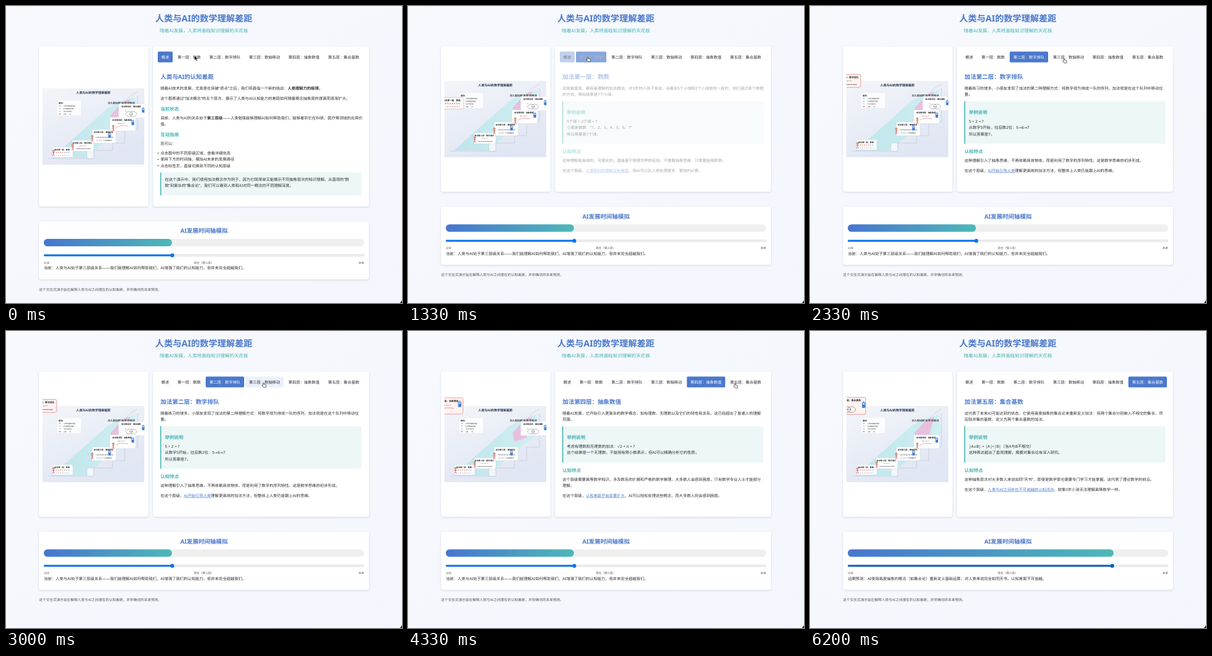
Recreate the animation shown at these times as an HTML page. Size 587 by 440 pixels, loop 6.26 s.

```html
<!DOCTYPE html>
<html lang="zh">
<head>
<meta charset="utf-8">
<style>
html, body { margin: 0; width: 100%; height: 100%; overflow: hidden; background: #f6f8fd; }
svg { display: block; width: 100vw; height: 100vh; }
text { font-family: "Noto Sans", "DejaVu Sans", "Noto Sans CJK SC", "Noto Sans CJK", sans-serif; font-weight: 500; text-rendering: geometricPrecision; fill: #2b2b2b; white-space: pre; }
.panel { fill: #fff; filter: drop-shadow(0 1.2px 1.8px rgba(40, 60, 110, .16)); }
</style>
</head>
<body>
<svg id="stage" viewBox="0 0 587 440">
  <defs>
    <linearGradient id="page" x2="1" y2="1"><stop stop-color="#f7f9fd"/><stop offset="1" stop-color="#f3f6fc"/></linearGradient>
    <linearGradient id="chartBg" x2=".5" y2="1"><stop stop-color="#f3f5f9"/><stop offset="1" stop-color="#e0e6f3"/></linearGradient>
    <linearGradient id="band" x2="1" y2=".2"><stop stop-color="#a5e0e6"/><stop offset="1" stop-color="#c9f0f0"/></linearGradient>
    <linearGradient id="fill"><stop stop-color="#4776cf"/><stop offset="1" stop-color="#4db8b8"/></linearGradient>
    <clipPath id="chartClip"><rect x="54" y="40" width="151.5" height="260"/></clipPath>
  </defs>
  <rect width="587" height="440" fill="url(#page)"/>
</svg>
<script>
const BLUE = '#4a78cb', TEAL = '#45b3b5', BODY = 5.78, LOOP = 6260, TICK = 200 / 3;
const stage = document.getElementById('stage');

function add(parent, tag, attrs = {}) {
  const el = document.createElementNS('http://www.w3.org/2000/svg', tag);
  set(el, attrs);
  parent.append(el);
  return el;
}
function set(el, attrs) {
  for (const key in attrs) el.setAttribute(key, attrs[key]);
}
function rect(parent, x, y, width, height, fill, rx = 0, more = {}) {
  return add(parent, 'rect', { x, y, width, height, fill, rx, ...more });
}
// y is the optical middle of the line; *bold* and [link] are marked inline
function label(parent, x, y, str, size = BODY, style = {}) {
  const el = add(parent, 'text', { x, y: y + size * .37, 'font-size': size });
  Object.assign(el.style, style);
  for (const part of str.split(/(\*[^*]+\*|\[[^\]]+\])/)) {
    if (!part) continue;
    const mark = part[0], marked = mark === '*' || mark === '[';
    const span = add(el, 'tspan');
    span.textContent = marked ? part.slice(1, -1) : part;
    if (mark === '*') span.style.fontWeight = 700;
    if (mark === '[') Object.assign(span.style, { fill: BLUE, textDecoration: 'underline' });
  }
  return el;
}
const bold = fill => ({ fontWeight: 700, fill });
const mid = style => ({ textAnchor: 'middle', ...style });

// Header and panels
label(stage, 293.3, 18, '人类与AI的数学理解差距', 13, mid(bold(BLUE)));
label(stage, 293.5, 36.5, '随着AI发展，人类将面临知识理解的天花板', 6.9, mid({ fill: TEAL }));
const panels = [[49, 162], [218, 320]].map(([x, w]) => rect(stage, x, 60, w, 237, '#fff', 3, { class: 'panel' }));
add(stage, 'path', { d: 'M587 436v4h-3z', fill: '#222' });

// Chart
const chart = add(add(stage, 'g', { 'clip-path': 'url(#chartClip)' }), 'g');
rect(chart, 54, 111, 151, 113, 'url(#chartBg)');
add(chart, 'path', { d: 'M68 214L150 141 168 131 190 124 196 150 160 178 130 204V214Z', fill: 'url(#band)', opacity: .7 });
add(chart, 'path', { d: 'M155 151L172 132 184 127 176 158 158 164Z', fill: '#f7a8d8', opacity: .65 });
add(chart, 'path', { d: 'M63 215H130V203H158V192H176V172H195V122', fill: 'none', stroke: '#b3bccb', 'stroke-width': .5 });
rect(chart, 120, 203, 10, 12, '#f2f7fb', 0, { stroke: '#b3bccb', 'stroke-width': .4 });
add(chart, 'path', { d: 'M176 132Q184 120 195 116', fill: 'none', stroke: '#d77a9f', 'stroke-width': .5, 'stroke-dasharray': '1 .7' });
label(chart, 129.5, 117.5, '人类与AI的数学理解差距', 4.6, mid(bold('#26324a')));
label(chart, 171, 133, '对人类如同“天书”的知识', 3.7, mid(bold('#333')));
rect(chart, 76, 129, 35, 22, '#fff', .8, { opacity: .85 });
label(chart, 78, 133, '图例:', 3, bold('#333'));
['人类可理解的范围', 'AI可理解的范围', '“天书”的知识', '人类        AI'].forEach((row, i) => {
  rect(chart, 78.5, 136.4 + i * 4, 2.6, 1.2, ['#8fb6e8', '#8adada', '#f7a8d8', '#e66'][i]);
  label(chart, 85, 137 + i * 4, row, 2.2);
});

function person(g, x, y) {
  add(g, 'circle', { cx: x, cy: y - 3, r: 1.4, fill: '#f0bd95', stroke: '#7a4a35', 'stroke-width': .5 });
  add(g, 'path', { d: `M${x} ${y - 1.5}v3.5l-1.4 2.6m1.4-2.6l1.4 2.6M${x - 1.8} ${y}h3.6`, stroke: '#d9534f', 'stroke-width': .8, fill: 'none' });
}
function robot(g, x, y) {
  rect(g, x - 2, y - 3.5, 4, 7, '#4a86dc', .8);
  rect(g, x - 1.3, y - 2.4, 2.6, 1.5, '#dcecff', .3);
  add(g, 'path', { d: `M${x} ${y - 3.5}v-1.4M${x - 1} ${y + 1}h2`, stroke: '#2b4f92', 'stroke-width': .5 });
}
function axis(g, x, y, w) {
  add(g, 'path', { d: `M${x} ${y}h${w}m-1-.8l1 .8l-1 .8`, stroke: '#444', 'stroke-width': .4, fill: 'none' });
  for (let i = 1; i < 7; i++) add(g, 'circle', { cx: x + i * w / 7, cy: y, r: .5, fill: i === 5 ? '#e33' : '#555' });
}
const art = [
  g => {
    for (let i = 0; i < 7; i++) add(g, 'circle', { cx: -9 + i * 3, cy: .5, r: .7, fill: i < 5 ? '#e4514d' : '#4a86dc' });
    label(g, 0, 4.5, '1、2、3、4、5、6、7', 2, mid({}));
    person(g, -13.5, 1);
  },
  g => {
    label(g, 0, 0, '5 + 2 = 7', 2.4, mid({}));
    axis(g, -11, 4.5, 22);
    person(g, -15, 2);
  },
  g => {
    axis(g, -13, 1.5, 26);
    label(g, 0, 6, '5 + 2.5 = 7.5 数轴移动', 2.3, mid({}));
    person(g, -17.5, 3);
    robot(g, 8, -1);
  },
  g => {
    label(g, -2, -1, '√2 + π = ?', 2.5, mid({}));
    add(g, 'path', { d: 'M-10 5Q-3 1 8 3', stroke: '#e33', 'stroke-width': .4, fill: 'none' });
    person(g, -14, 6);
    robot(g, 15, -2);
  },
  g => {
    for (const x of [-4, 2]) add(g, 'ellipse', { cx: x, cy: 4.5, rx: 5, ry: 3.6, fill: 'none', stroke: '#555', 'stroke-width': .4 });
    label(g, -1, 4.5, 'A∪B', 2.2, mid({}));
    label(g, -10, 0, '?', 3, bold('#e33'));
    robot(g, 17, -1);
  }
];
// centre, size, title, right edge when selected
const GROW = .2;
const cards = [
  [84, 205.5, 30, 15, '加法第一层：数数', 74],
  [114, 196, 32, 16, '加法第二层：数字排队', 75],
  [145.5, 182, 35, 20, '加法第三层：数轴移动', 79],
  [173, 164, 38, 20, '加法第四层：抽象数值', 81.5],
  [186.5, 144.5, 39, 21, '加法第五层：集合基数', 82.5]
].map(([cx, cy, w, h, title, right], i) => {
  const g = add(chart, 'g'), box = [-w / 2, -h / 2, w, h];
  rect(g, ...box, '#fff', 1, { stroke: '#c9d3e2', 'stroke-width': .4 });
  const glow = rect(g, ...box, '#fff3f2', 2, { stroke: '#f08a8a', 'stroke-width': .6 });
  label(g, -1, -h / 2 + 4, title, 2.9, mid(bold('#222')));
  art[i](g);
  return { g, glow, cx, cy, tx: right - w * (1 + GROW) / 2 };
});

// Tabs
const tabs = [
  ['概述', 225, 22], ['第一层：数数', 249, 45], ['第二层：数字排队', 296, 57],
  ['第三层：数轴移动', 354.8, 56.8], ['第四层：抽象数值', 413.4, 56.8], ['第五层：集合基数', 472, 57]
].map(([name, x, w]) => ({
  hover: rect(stage, x, 67.4, w, 16.2, '#ebf1fb', 1.6),
  on: rect(stage, x, 67.4, w, 16.2, BLUE, 1.6),
  text: label(stage, x + w / 2, 75.6, name, BODY, mid({}))
}));

// Tab pages: one line is [y, text, x?]
function page(title, heads, box, lines) {
  const g = add(stage, 'g');
  rect(g, 228.5, box[0], 298.5, box[1] - box[0], '#edf7f7', 1.5);
  rect(g, 228.5, box[0], 1.7, box[1] - box[0], '#56bdbb');
  label(g, 229, 105, title, 8.7, bold(BLUE));
  for (const [y, str, x = 229] of heads) label(g, x, y, str, 6.8, bold(TEAL));
  for (const [y, str, x = 229] of lines) label(g, x, y, str);
  return g;
}
const IN = 235.5;
const lesson = (title, bottom, lines) => page(title,
  [[157, '举例说明', IN], [bottom + 11, '认知特点']], [141, bottom], lines);
const pages = [
  page('人类与AI的认知差距', [[152, '当前状态'], [190, '互动指南']], [246.5, 280.5], [
    [122, '随着AI技术的发展，尤其是在突破“奇点”之后，我们将面临一个新的挑战：*人类理解力的极限*。'],
    [136.5, '这个图表通过“加法概念”的五个层次，展示了人类与AI认知能力的差距如何随着概念抽象度的提高而逐渐扩大。'],
    [166, '目前，人类与AI的关系处于*第三层级*——人类勉强能够理解AI如何帮助我们，能够看到它在科研、医疗等领域的应用价'],
    [175, '值。'],
    [203.5, '您可以：'],
    [218, '点击图中的不同层级区域，查看详细信息'],
    [227.2, '使用下方的时间轴，模拟AI未来的发展路径'],
    [236.5, '点击标签页，直接切换到不同的认知层级'],
    [256.5, '在这个演示中，我们使用加法概念作为例子，因为它既简单又能展示不同抽象层次的知识理解。从直观的“数', IN],
    [266, '数”到复杂的“集合论”，我们可以看到人类和AI对同一概念的不同理解深度。', IN]
  ]),
  lesson('加法第一层：数数', 204, [
    [122, '这是最直观、最容易理解的加法概念。对3岁的小孩子来说，当看到5个小球和2个小球放在一起时，他们通过逐个数数'],
    [131, '的方式，得出结果是7个小球。'],
    [171, '5个球 + 2个球 = ?', IN],
    [180, '小朋友数数：“1、2、3、4、5、6、7”', IN],
    [189.5, '所以答案是7个球。', IN],
    [229, '这种理解是具体的、可视化的，直接基于物理世界的经验。不需要抽象思维，只需要能够数数。'],
    [243.5, '在这个层级，[人类和AI的理解没有差距]，但AI可以比人类处理更多、更快的计算。']
  ]),
  lesson('加法第二层：数字排队', 204, [
    [122, '随着练习的增多，小朋友发现了加法的第二种理解方式：将数字视为排成一队的序列，加法就是在这个队列中移动位'],
    [131, '置。'],
    [171, '5 + 2 = ?', IN],
    [180, '从数字5开始，往后数2位：5→6→7', IN],
    [189.5, '所以答案是7。', IN],
    [229, '这种理解引入了抽象思维，不再依赖具体物体，而是利用了数字的序列特性。这是数学思维的初步形成。'],
    [243.5, '在这个层级，[AI开始引导人类]理解更高效的加法方法，但整体上人类仍能跟上AI的思维。']
  ]),
  lesson('加法第三层：数轴移动', 204, [
    [122, '这个层级代表了我们目前所处的阶段。AI将“数字排队”的概念扩展到更抽象的“数轴”上，不仅包含整数，还有分数和小'],
    [131, '数。'],
    [171, '在数轴上，5 + 2.5 = ?', IN],
    [180, '从位置5开始，向右移动2.5个单位', IN],
    [189.5, '所以答案是7.5。', IN],
    [229, '这种理解引入了更复杂的数学概念（连续性、实数线），但人类通过努力，仍然能够理解这个抽象概念。这代表了基础'],
    [238, '教育中的数学概念。'],
    [252.5, '[我们现在就处于这个阶段]——AI能够帮助我们理解和解决问题，而我们也能大致理解AI的思考方式。']
  ]),
  lesson('加法第四层：抽象数值', 195, [
    [122, '随着AI发展，它开始引入更复杂的数学概念，如有理数、无理数以及它们的特性和关系。这已经超出了普通人的理解'],
    [131, '范围。'],
    [171, '考虑有理数和无理数的加法：√2 + π = ?', IN],
    [180, '这个结果是一个无理数，不能用有限小数表示，但AI可以精确分析它的性质。', IN],
    [220, '这个层级需要高等数学知识，涉及数系的扩展和严格的数学推理。大多数人会感到困惑，只有数学专业人士才能部分'],
    [229, '理解。'],
    [243.5, '在这个层级，[认知差距开始显著扩大]，AI可以轻松处理这些概念，而大多数人则会感到困惑。']
  ]),
  lesson('加法第五层：集合基数', 195, [
    [122, '这代表了未来AI可能达到的状态，它使用高度抽象的集合论来重新定义加法：将两个集合分别嵌入不相交的集合，然'],
    [131, '后取并集的基数，定义为两个集合基数的加法。'],
    [171, '|A∪B| = |A|+|B|（当A与B不相交）', IN],
    [180, '这种表达超出了直观理解，需要对集合论有深入研究。', IN],
    [220, '这种抽象层次对大多数人来说如同“天书”，即使是数学家也需要专门学习才能掌握。这代表了理论数学的前沿。'],
    [234.5, '在这个层级，[人类与AI之间存在不可逾越的认知鸿沟]，就像3岁小孩无法理解高等数学一样。']
  ])
];
for (const y of [218, 227.2, 236.5]) add(pages[0], 'circle', { cx: 225.5, cy: y, r: .8, fill: '#333' });

// Timeline panel and footer
const low = add(stage, 'g');
rect(low, 49, 319, 489, 86, '#fff', 3, { class: 'panel' });
label(low, 293.5, 333, 'AI发展时间轴模拟', 8.7, mid(bold(BLUE)));
rect(low, 56, 345, 475, 11, '#efefef', 5.5);
const fill = rect(low, 56, 345, 190, 11, 'url(#fill)', 5.5);
rect(low, 56, 368, 475, 2.8, '#ededed', 1.4, { stroke: '#d2d2d2', 'stroke-width': .4 });
const track = rect(low, 56, 368, 190, 2.8, '#0a75f0', 1.4);
const thumb = add(low, 'circle', { cy: 369.4, r: 2.8 });
label(low, 56, 380, '过去', 4.2, { fill: '#555' });
label(low, 293, 380, '现在（第三层）', 4.2, mid({ fill: '#555' }));
label(low, 531, 380, '未来', 4.2, { textAnchor: 'end', fill: '#555' });
const notes = [
  '当前：人类与AI处于第三层级关系——我们能理解AI如何帮助我们，AI增强了我们的认知能力，但并未完全超越我们。',
  '远期预测：AI使用高度抽象的概念（如集合论）重新定义基础运算，对人类来说完全如同天书。认知差距不可逾越。'
].map(str => label(low, 56.3, 388.3, str));
label(low, 49, 420, '这个交互式演示旨在解释人类与AI之间潜在的认知差距，并非确切的未来预测。', 5.2, { fill: '#555' });

// Pointer
const pointer = add(stage, 'g');
const ink = { fill: '#fff', stroke: '#111', 'stroke-width': .6, 'stroke-linejoin': 'round' };
const arrow = add(pointer, 'path', { d: 'M-1.5-3.5v7l1.7-1.5 1.2 2.4 1.1-.5-1.1-2.3h2.2z', ...ink, fill: '#111', stroke: '#fff', 'stroke-width': .4 });
const hand = add(pointer, 'path', { d: 'M-2 .3v-3.3q.7-1 1.4 0v2.1l2.4.4q1 .2 .9 1.2l-.5 2.6h-3.6l-2-2.7q.1-1 1.4-.3z', ...ink });

// Steps on the tick grid: [tick, tab, progress]
const STEPS = [
  [0, 0, 1], [12, 1, .12], [20, 1, .65], [21, 1, .88], [22, 1, 1],
  [29, 2, .3], [30, 2, .65], [31, 2, .88], [32, 2, 1], [48, 3, .6], [49, 3, 1],
  [62, 4, .5], [63, 4, .85], [64, 4, 1],
  [81, 5, .47], [82, 5, .7], [83, 5, .85], [84, 5, .95], [85, 5, 1]
];
const MOVES = [
  [0, 281, 77], [1, 281, 77], [11, 268, 79], [24, 268, 79], [28, 325, 80], [32, 325, 80],
  [35, 378, 81], [39, 378, 81], [45, 383, 80], [53, 383, 80], [56, 428, 81], [63, 428, 81],
  [65, 486, 81], [69, 486, 81], [74, 490, 80], [82, 490, 80], [86, 447, 347], [99, 447, 347]
];
const HOVER = [[3, 1], [12, -1], [26, 2], [29, -1], [40, 3], [48, -1], [55, 4], [62, -1], [70, 5], [81, -1]];
const mix = (a, b, p) => a + (b - a) * p;
const last = (table, k) => table.filter(row => row[0] <= k).pop();

function render(ms) {
  const k = Math.floor((ms % LOOP + 7) / TICK);
  const [, tab, p] = last(STEPS, k);
  const level = i => i === tab ? p : i === tab - 1 ? 1 - p : 0;
  const first = tab === 0, far = k >= 92;

  panels.forEach(el => set(el, { height: first ? 237 : 215.3 }));
  set(chart, { transform: `translate(0 ${first ? 11 : 0})` });
  set(low, { transform: `translate(0 ${first ? 0 : -21.5})` });

  const over = (last(HOVER, k) || [0, -1])[1];
  tabs.forEach((t, i) => {
    const v = level(i), c = Math.round(mix(43, 255, v));
    set(t.hover, { opacity: i === over ? 1 : 0 });
    set(t.on, { opacity: v });
    t.text.style.fill = `rgb(${c},${c},${c})`;
  });
  pages.forEach((g, i) => set(g, { opacity: i === tab ? p * p : 0 }));
  cards.forEach((c, i) => {
    const v = level(i + 1);
    set(c.g, { transform: `translate(${mix(c.cx, c.tx, v)} ${mix(c.cy, 111, v)}) scale(${1 + GROW * v})` });
    set(c.glow, { opacity: v * v });
  });

  const at = far ? 392 : 190.5, color = far ? '#0b5fbd' : '#0a75f0';
  set(fill, { width: k === 92 ? 290 : far ? 394 : 190 });
  set(track, { width: at, fill: color });
  set(thumb, { cx: 56 + at, fill: color });
  notes.forEach((el, i) => set(el, { opacity: +(far === !!i) }));

  const n = MOVES.findIndex(row => row[0] > k), a = MOVES[n - 1], b = MOVES[n];
  const q = (k - a[0]) / (b[0] - a[0]);
  set(pointer, { transform: `translate(${mix(a[1], b[1], q)} ${mix(a[2], b[2], q)})`, opacity: far ? 0 : 1 });
  set(arrow, { opacity: k < 3 ? 1 : 0 });
  set(hand, { opacity: k < 3 ? 0 : 1 });
}

const start = performance.now();
function loop() {
  render(performance.now() - start);
  requestAnimationFrame(loop);
}
loop();
</script>
</body>
</html>
```
